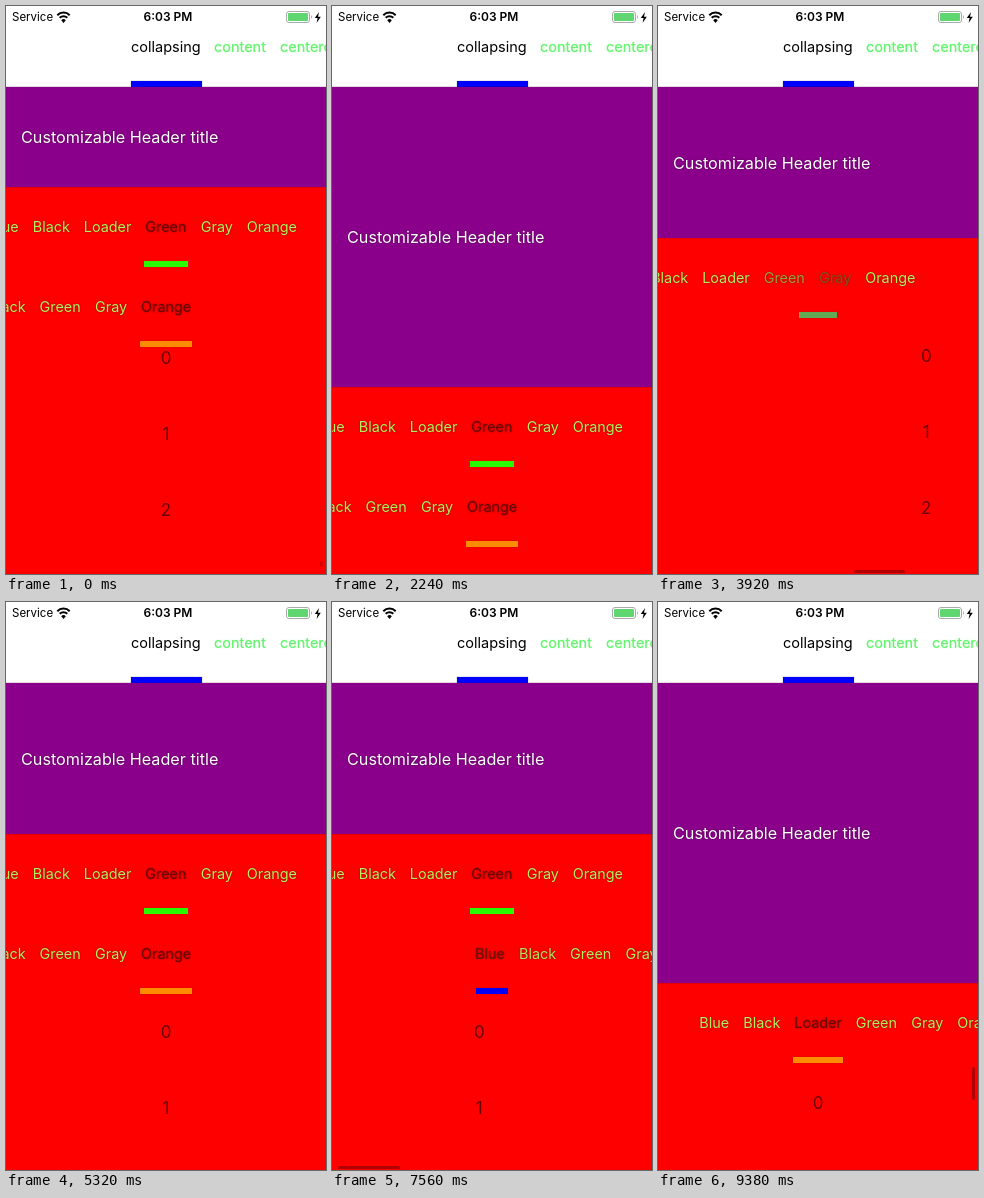
These frames come from a looping animation (320 px wide and 568 px high, 9.45 s). An HTML page:

```html
<!DOCTYPE html>
<html lang="en">
<head>
<meta charset="utf-8">
<title>Collapsing header tabs</title>
<style>
html, body { margin: 0; width: 100%; height: 100%; overflow: hidden; background: #fff; }
#stage { position: relative; width: 320px; height: 568px; overflow: hidden; background: #f00; font: 15px Inter, Roboto, sans-serif; }
#stage div, #stage span, svg { position: absolute; }
#stage span { white-space: pre; line-height: 20px; }
#top { left: 0; top: 0; width: 320px; height: 81px; background: #fff; }
#top .status { top: 1px; font-size: 12px; }
#top .tab { top: 31px; font-size: 14.5px; }
#top .idle { color: #66f272; text-shadow: 0 0 1px #8f8; }
#header { left: 0; top: 81px; width: 320px; background: #8b008b; box-shadow: 0 0 1px rgba(50, 0, 50, .8); }
#title { left: 15px; color: #fff; font-size: 16.2px; text-shadow: 0 0 2px rgba(40, 0, 40, .7); }
#body { left: 0; top: 0; width: 320px; height: 568px; }
.page, .strip { left: 0; top: 0; width: 320px; height: 0; }
.strip span { font-size: 14.4px; top: 30px; text-shadow: 0 0 2px rgba(90, 0, 0, .7); }
.line { top: 74px; height: 6px; box-shadow: 0 0 1px rgba(60, 40, 0, .6); }
.num { width: 40px; left: 140px; text-align: center; font-size: 17px; color: #680000; }
.bar { background: rgba(0, 0, 0, .3); border-radius: 2px; }
</style>
</head>
<body>
<div id="stage">
  <div id="body"></div>
  <div id="top">
    <svg width="320" height="24" viewBox="0 0 320 24">
      <g fill="none" stroke="#000" stroke-width="2">
        <path d="M51.3 9.2a8.6 8.6 0 0 1 12.4 0M53.7 11.8a5.4 5.4 0 0 1 7.6 0"/>
        <rect x="280.5" y="5.5" width="23" height="11" rx="2.5" stroke="#aaa" stroke-width="1"/>
      </g>
      <path d="M57.5 17l-2.3-2.8a3.3 3.3 0 0 1 4.6 0zM313 6l-4.2 6h2.8l-1 5 4.2-6.2h-2.8z"/>
      <rect x="282" y="7" width="20" height="8" rx="1" fill="#5fd670"/>
      <path d="M305 9q2 2 0 4z" fill="#aaa"/>
    </svg>
    <span class="status" style="left:6px;font-size:11.5px">Service</span>
    <span class="status" style="left:102px;width:120px;text-align:center;font-weight:600">6:03 PM</span>
    <span class="tab" style="left:125px">collapsing</span>
    <span class="tab idle" style="left:208px">content</span>
    <span class="tab idle" style="left:274px">centered</span>
    <div class="line" style="left:124.5px;top:75px;width:71px;background:#00f"></div>
  </div>
  <div id="header"><span id="title">Customizable Header title</span></div>
</div>
<script>
const LOOP = 9450, STEP = 70, WIDTH = 320, PITCH = 76, GAP = 14;
const TABS = {
  Blue: { width: 30, color: [0, 0, 255] },
  Black: { width: 37, color: [0, 0, 0] },
  Loader: { width: 47.5, color: [255, 140, 0] },
  Green: { width: 41.5, color: [40, 250, 0] },
  Gray: { width: 32, color: [128, 128, 128] },
  Orange: { width: 50, color: [255, 140, 0] }
};
const OUTER = Object.keys(TABS);
const INNER = OUTER.filter(name => name !== 'Loader');
const IDLE = [180, 240, 88], ACTIVE = [104, 8, 0];

// Each track lists [time, value]; values ease between entries.
const TRACKS = {
  header: [[350, 100], [1300, 300], [2450, 300], [3250, 151], [8520, 151], [9240, 300]],
  scroll: [[0, 27], [350, 0]],
  outer: [[3600, 3], [4125, 4], [4550, 4], [5100, 3], [7880, 3], [8380, 2]],
  inner: [[5350, 4], [5760, 3], [5890, 3], [6300, 2], [6520, 2], [6970, 1], [7150, 1], [7616, 0]],
  bounce: [[9170, 0], [9310, 3], [9450, 1]]
};

const stage = document.getElementById('stage');
const body = document.getElementById('body');
const header = document.getElementById('header');
const title = document.getElementById('title');

const mix = (a, b, k) => a + (b - a) * k;
const mixColor = (a, b, k) => `rgb(${a.map((v, i) => Math.round(mix(v, b[i], k)))})`;

function valueAt(track, t) {
  if (t <= track[0][0]) return track[0][1];
  for (let i = 1; i < track.length; i++) {
    const [t0, v0] = track[i - 1], [t1, v1] = track[i];
    if (t < t1) {
      const u = (t - t0) / (t1 - t0);
      return mix(v0, v1, u * u * (3 - 2 * u));
    }
  }
  return track[track.length - 1][1];
}

function add(parent, tag, className = '', text = '') {
  const el = document.createElement(tag);
  el.className = className;
  el.textContent = text;
  parent.append(el);
  return el;
}

function makeTabs(parent, names, top) {
  const strip = add(parent, 'div', 'strip');
  strip.style.top = top + 'px';
  const labels = names.map(name => add(strip, 'span', '', name));
  const line = add(strip, 'div', 'line');
  const bar = add(stage, 'div', 'bar');
  Object.assign(bar.style, { top: '564px', height: '3px', width: WIDTH / names.length - 2 + 'px' });

  let end = 0;
  const centers = names.map(name => {
    const center = end + TABS[name].width / 2;
    end += TABS[name].width + GAP;
    return center;
  });

  return position => {
    const i = Math.min(Math.floor(position), names.length - 2), k = position - i;
    const from = TABS[names[i]], to = TABS[names[i + 1]];
    const shift = WIDTH / 2 - mix(centers[i], centers[i + 1], k);
    labels.forEach((label, n) => {
      label.style.left = centers[n] - TABS[names[n]].width / 2 + shift + 'px';
      label.style.color = mixColor(IDLE, ACTIVE, Math.max(0, 1 - Math.abs(n - position)));
    });
    const width = mix(from.width, to.width, k) + 2;
    line.style.left = (WIDTH - width) / 2 + 'px';
    line.style.width = width + 'px';
    line.style.background = mixColor(from.color, to.color, k);
    bar.hidden = position % 1 === 0;
    bar.style.left = 3 + position * (WIDTH - 4) / names.length + 'px';
  };
}

function makeList(parent, top) {
  const list = add(parent, 'div', 'page');
  for (let n = 0; n < 6; n++) {
    add(list, 'span', 'num', n).style.top = top - 10 + n * PITCH + 'px';
  }
  return list;
}

const placePages = (pages, position) => pages.forEach((page, n) => {
  page.style.left = (n - position) * WIDTH + 'px';
});

const outerPages = OUTER.map(name => name === 'Green' ? add(body, 'div', 'page') : makeList(body, 118));
const greenPage = outerPages[OUTER.indexOf('Green')];
const innerPages = INNER.map(() => makeList(greenPage, 198));
const setInner = makeTabs(greenPage, INNER, 80);
const setOuter = makeTabs(body, OUTER, 0);
const sideBar = add(stage, 'div', 'bar');
Object.assign(sideBar.style, { left: '314px', width: '3px' });

function draw(t) {
  const at = name => valueAt(TRACKS[name], t);
  const height = at('header'), scroll = at('scroll'), outer = at('outer'), inner = at('inner');

  header.style.height = height + 'px';
  title.style.top = height / 2 - 10 + 'px';
  body.style.top = 81 + height + 'px';

  setOuter(outer);
  setInner(inner);
  placePages(outerPages, outer);
  placePages(innerPages, inner);
  innerPages.forEach(page => { page.style.top = -scroll + 'px'; });
  outerPages.forEach(page => { if (page !== greenPage) page.style.top = at('bounce') + 'px'; });

  const pulling = t >= 8520;
  sideBar.hidden = !pulling && scroll === 0;
  sideBar.style.top = (pulling ? height + 165 : 555) + 'px';
  sideBar.style.height = (pulling ? 33 : 6) + 'px';
  sideBar.style.opacity = pulling ? 1 : .5;
}

const start = performance.now();
function tick() {
  const t = (performance.now() - start) % LOOP;
  draw(Math.floor(t / STEP) * STEP);
  requestAnimationFrame(tick);
}
tick();
</script>
</body>
</html>
```
